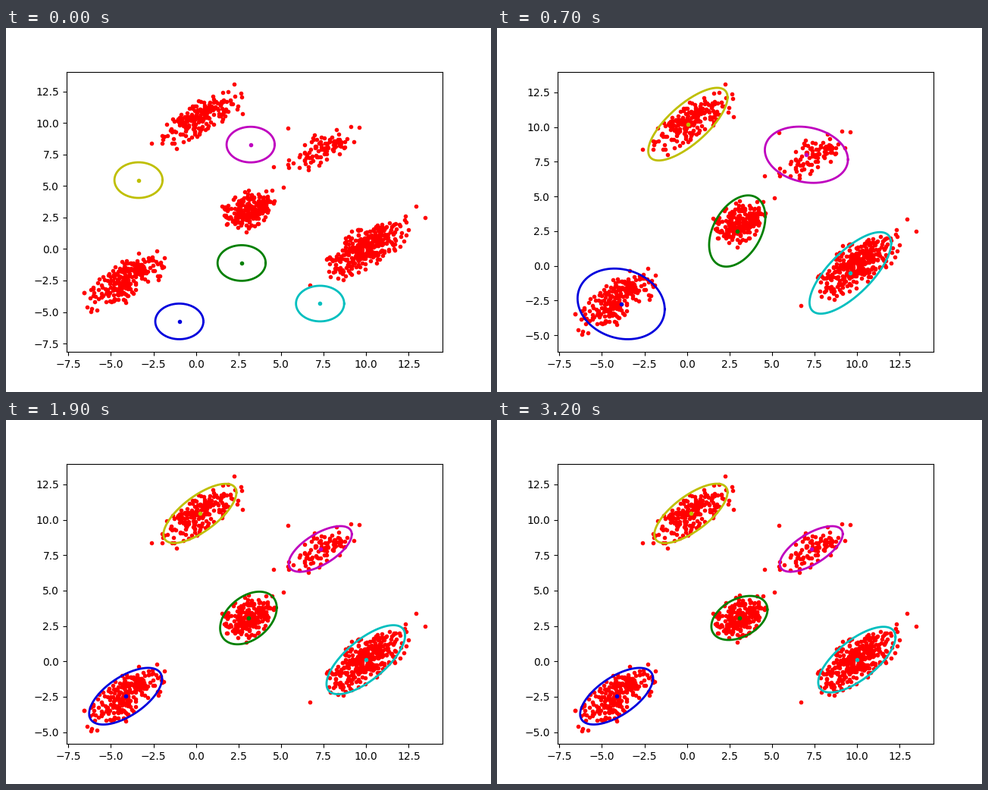
Animation, 640 px wide and 480 px high, one loop 3.3 s. Source, as a matplotlib script:

```python
from collections import namedtuple

import numpy as np
import matplotlib.pyplot as plt
from matplotlib.animation import FuncAnimation

FRAMES, STEP = 33, 100

# start, mean, sigma, rho: first guess and final Gaussian of a cluster
# bow: sideways swing of the path; stretch: extra spread while converging
# pace, hold: steps until the mean arrives and the extra spread fades
Cluster = namedtuple(
    "Cluster", "color count start mean sigma rho bow stretch pace hold")

CLUSTERS = [
    Cluster("y", 200, (-3.38, 5.47), (0.23, 10.45), (1.075, 1.05), 0.71,
            (0, 0), (0.95, 1.34), 2.9, 7.6),
    Cluster("m", 90, (3.21, 8.29), (7.3, 7.94), (0.925, 0.805), 0.66,
            (0, 1.15), (1.06, -0.8), 3.2, 10),
    Cluster("g", 215, (2.68, -1.11), (3.08, 3.065), (0.825, 0.775), 0.38,
            (-0.72, 0), (0.25, 1.11), 4.0, 16),
    Cluster("c", 320, (7.29, -4.33), (9.98, 0.12), (1.135, 1.16), 0.69,
            (0, 0), (0.68, 1.13), 4.1, 14),
    Cluster("#0000dd", 230, (-0.98, -5.746), (-4.14, -2.465), (1.07, 1.0), 0.63,
            (0, 0), (-1.02, 1.08), 3.4, 10),
]

# Outermost points; they also set the axis limits
EDGE = [(2.23, 13.066), (-2.62, 8.37), (2.72, 10.73), (9.59, 9.66),
        (5.4, 9.61), (4.55, 6.5), (5.13, 4.89), (13.48, 2.48),
        (12.93, 3.39), (6.69, -2.88), (-6.6, -3.47), (-6.2, -4.94)]


def covariance(c):
    (sx, sy), xy = c.sigma, c.rho * c.sigma[0] * c.sigma[1]
    return np.array([[sx ** 2, xy], [xy, sy ** 2]])


def place(mean, cov, r, a):
    """Map polar coordinates in sigma units onto a Gaussian."""
    unit = np.array([r * np.cos(a), r * np.sin(a)])
    return np.array(mean)[:, None] + np.linalg.cholesky(cov) @ unit


def decay(t, scale, power):
    return np.exp(-(t / scale) ** power)


def fit_at(c, t):
    """Mean and covariance of the running fit after t steps."""
    start, mean = np.array(c.start), np.array(c.mean)
    left = decay(t, c.pace, 1.25)
    swing = 27 / 4 * left ** 2 * (1 - left)
    center = mean + (start - mean) * left + np.array(c.bow) * swing

    final = covariance(c)
    extra = (1 - np.exp(-t / 1.5)) * decay(t, c.hold, 2.5)
    cov = (final + (0.5 * np.eye(2) - final) * decay(t, 6, 1.3)
           + extra * np.outer(c.stretch, c.stretch))
    return center, cov


def cloud(rng, c, reach=2.4):
    """Normal samples, cut off at reach sigmas."""
    u = rng.random(c.count) * (1 - np.exp(-reach ** 2 / 2))
    r = np.sqrt(-2 * np.log(1 - u))
    return place(c.mean, covariance(c), r, rng.uniform(0, 2 * np.pi, c.count))


rng = np.random.default_rng(11)
x, y = np.hstack([cloud(rng, c) for c in CLUSTERS] + [np.transpose(EDGE)])

fig, ax = plt.subplots(figsize=(6.4, 4.8), dpi=100)
ax.plot(x, y, "r.")
pad_x = 0.05 * np.ptp(x)
ax.set_xlim(x.min() - pad_x, x.max() + pad_x)
dots = [ax.plot([], [], ".", color=c.color)[0] for c in CLUSTERS]
rings = [ax.plot([], [], color=c.color, lw=2)[0] for c in CLUSTERS]
theta = np.linspace(0, 2 * np.pi, 181)


def update(t):
    low, high = y.min(), y.max()
    for c, dot, ring in zip(CLUSTERS, dots, rings):
        center, cov = fit_at(c, t)
        outline = place(center, cov, 2, theta)
        dot.set_data(center[:1], center[1:])
        ring.set_data(*outline)
        low, high = min(low, outline[1].min()), max(high, outline[1].max())
    pad = 0.05 * (high - low)
    ax.set_ylim(low - pad, high + pad)
    return dots + rings


anim = FuncAnimation(fig, update, frames=FRAMES, interval=STEP,
                     repeat=True, repeat_delay=0, blit=False)
plt.show()
```
